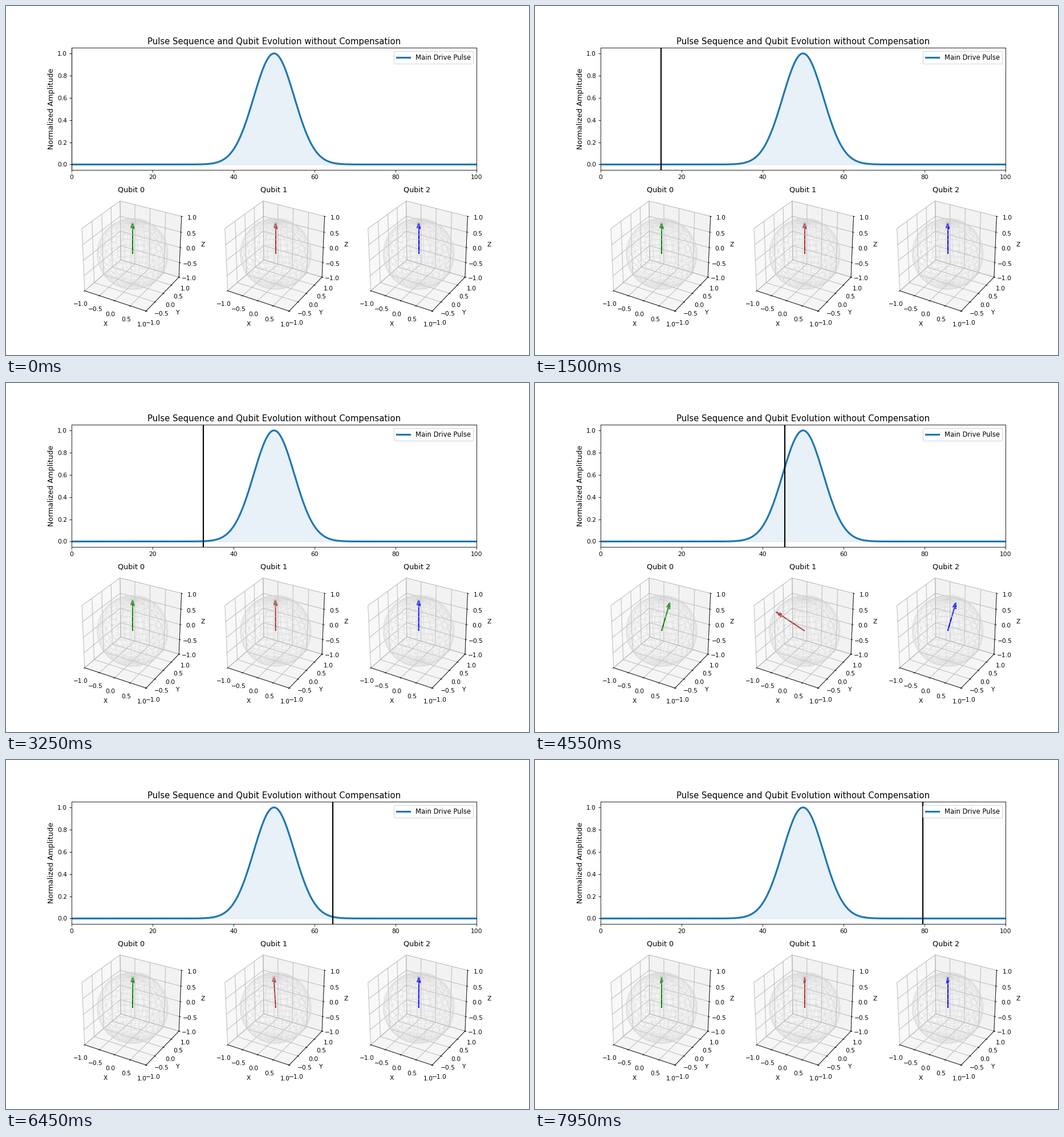
Recreate the animation shown at these times as a matplotlib script. Size 917 by 611 pixels, loop 8000 ms.

```python
import numpy as np
import matplotlib.pyplot as plt
from matplotlib.animation import FuncAnimation

WIDTH, HEIGHT = 917, 611
DPI = WIDTH / 12
FRAMES, INTERVAL = 160, 50
PEAK, SIGMA = 50, 5
# (name, arrow colour, drive strength over detuning)
QUBITS = [("Qubit 0", "green", 0.4),
          ("Qubit 1", "brown", -4.0),
          ("Qubit 2", "blue", 0.4)]


def pulse(t):
    return np.exp(-(t - PEAK) ** 2 / (2 * SIGMA ** 2))


def bloch_vector(t, ratio):
    """Spin following the effective field, with a tiny residue afterwards."""
    residue = 1e-6 if t > PEAK else 0.0
    v = np.array([ratio * pulse(t), residue, 1.0])
    return v / np.linalg.norm(v)


def setup_pulse(ax):
    t = np.linspace(0, 100, 1000)
    ax.plot(t, pulse(t), lw=3, color="tab:blue", label="Main Drive Pulse")
    ax.fill_between(t, pulse(t), color="tab:blue", alpha=0.1)
    ax.set_xlim(0, 100)
    ax.set_title("Pulse Sequence and Qubit Evolution without Compensation",
                 fontsize=14)
    ax.set_ylabel("Normalized Amplitude", fontsize=12)
    ax.legend(loc="upper right", fontsize=11)
    return ax.axvline(0, color="black", lw=2)


def setup_sphere(ax, name):
    u, v = np.mgrid[0:2 * np.pi:30j, 0:np.pi:20j]
    ax.plot_wireframe(np.cos(u) * np.sin(v), np.sin(u) * np.sin(v), np.cos(v),
                      color="lightgray", alpha=0.3)
    ax.set(xlim=(-1, 1), ylim=(-1, 1), zlim=(-1, 1),
           xlabel="X", ylabel="Y", zlabel="Z", title=name)
    ax.set_box_aspect((1, 1, 1))


fig = plt.figure(figsize=(12, (HEIGHT + 1e-6) / DPI), dpi=DPI)
grid = fig.add_gridspec(2, 3)
cursor = setup_pulse(fig.add_subplot(grid[0, :]))
spheres = [fig.add_subplot(grid[1, i], projection="3d") for i in range(3)]
for ax, (name, _, _) in zip(spheres, QUBITS):
    setup_sphere(ax, name)
arrows = []


def update(frame):
    t = frame * 0.5
    cursor.set_xdata([t, t])
    while arrows:
        arrows.pop().remove()
    for ax, (_, color, ratio) in zip(spheres, QUBITS):
        arrows.append(ax.quiver(0, 0, 0, *bloch_vector(t, ratio), color=color,
                                lw=2, arrow_length_ratio=0.2))
    return [cursor, *arrows]


anim = FuncAnimation(fig, update, frames=FRAMES, interval=INTERVAL,
                     init_func=lambda: update(0), repeat=True, repeat_delay=0)
plt.show()
```
